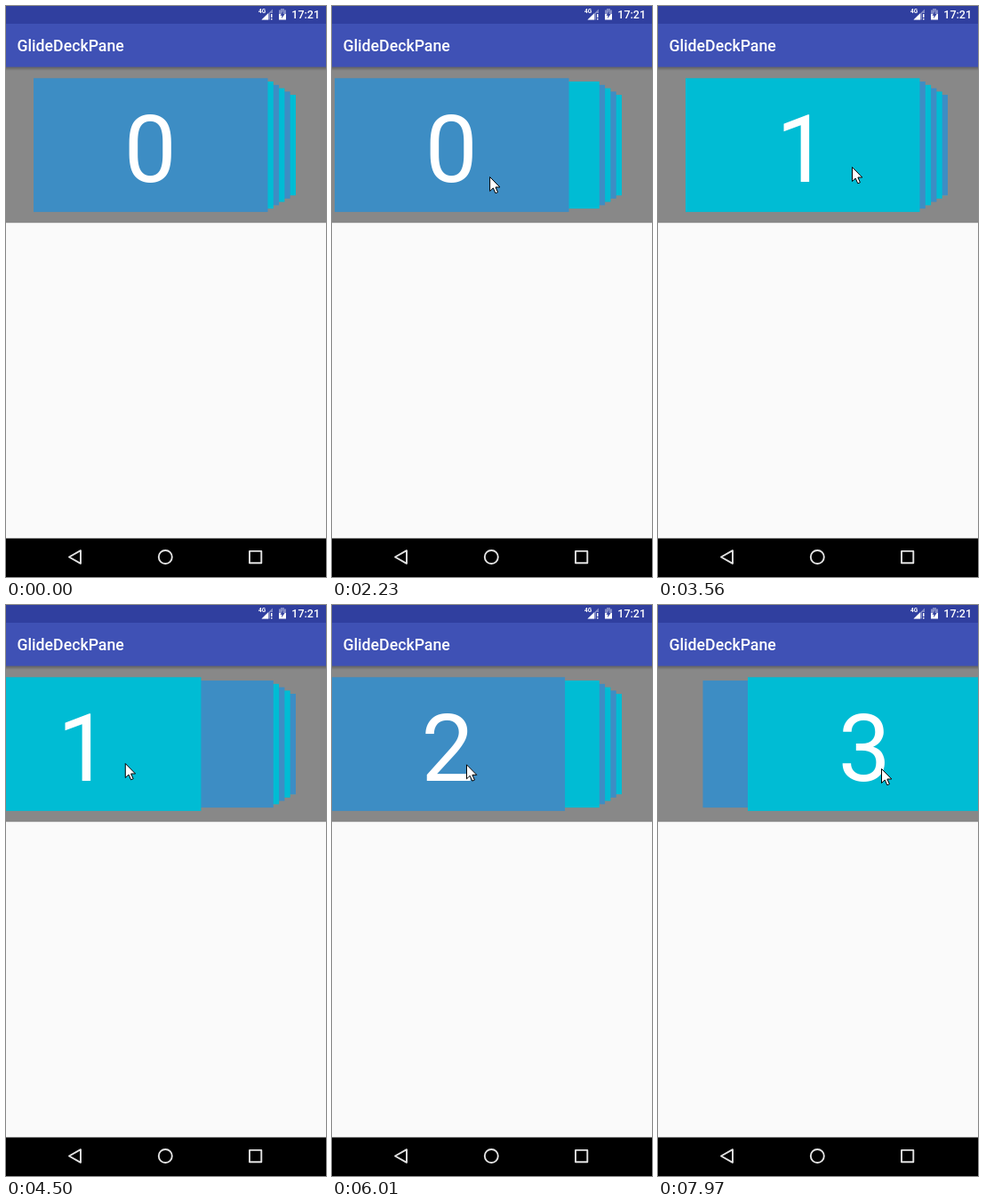
An HTML page with a canvas for the animation above (8 s loop, 360 by 643 pixels).

```html
<!DOCTYPE html>
<html lang="en">
<head>
<meta charset="utf-8">
<title>Card deck</title>
<style>
html, body { margin: 0; width: 100%; height: 100%; overflow: hidden; background: #fafafa; }
canvas { display: block; width: 360px; height: 643px; }
</style>
</head>
<body>
<canvas id="stage"></canvas>
<script>
const W = 360, H = 643, LOOP = 8000;
const canvas = document.getElementById('stage');
const ctx = canvas.getContext('2d');
const dpr = window.devicePixelRatio || 1;
canvas.width = W * dpr;
canvas.height = H * dpr;

// The screen refreshes in evenly stepped bursts: first step, last step, count.
const bursts = [
  [710, 1700, 8], [1950, 2890, 8], [3040, 3560, 5], [3990, 4920, 8],
  [5070, 5490, 4], [5760, 6730, 8], [6850, 7420, 5], [7700, 7970, 3]
];

// One accelerating swipe per card, in deck order.
const swipes = [
  { start: 1950, time: 894, dist: -310 },
  { start: 3990, time: 1080, dist: -310 },
  { start: 5760, time: 857, dist: -310 },
  { start: 7650, time: 320, dist: 70 }
];
const SETTLE_DELAY = 33, SETTLE_TIME = 350;

// Turning points of the mouse pointer: time, x, y.
const pointer = [
  [710, 287, 548], [1700, 221, 193], [2220, 177, 192], [2600, 120, 196],
  [2890, 162, 197], [3560, 218, 181], [4520, 134, 178], [4700, 105, 178],
  [5350, 238, 181], [6590, 81, 178], [7420, 173, 185], [7970, 251, 184]
];

const clamp = (v, lo, hi) => Math.min(hi, Math.max(lo, v));
const mix = (a, b, f) => a + (b - a) * f;
const ease = f => (1 - Math.cos(Math.PI * clamp(f, 0, 1))) / 2;

function stepTime(t) {
  const burst = bursts.filter(b => b[0] <= t).pop();
  if (!burst) return 0;
  const [first, last, count] = burst;
  const step = (last - first) / (count - 1);
  return first + step * Math.min(count - 1, Math.floor((t - first) / step + 0.2));
}

function dragOffset(swipe, t) {
  return swipe ? swipe.dist * clamp((t - swipe.start) / swipe.time, 0, 1) ** 2 : 0;
}

// How many places the deck has moved forward.
function deckShift(t) {
  return swipes.reduce((sum, s) =>
    sum + ease((t - s.start - s.time - SETTLE_DELAY) / SETTLE_TIME), 0);
}

function rect(color, x, y, w, h) {
  ctx.fillStyle = color;
  ctx.fillRect(x, y, w, h);
}

function path(points) {
  ctx.beginPath();
  points.forEach(([x, y]) => ctx.lineTo(x, y));
  ctx.closePath();
}

function fillPath(color, points) {
  path(points);
  ctx.fillStyle = color;
  ctx.fill();
}

function label(text, x, y, font, align = 'left') {
  ctx.font = font + ' Roboto, sans-serif';
  ctx.textAlign = align;
  ctx.fillStyle = '#fff';
  ctx.fillText(text, x, y);
}

function drawStatus() {
  const dim = 'rgba(255,255,255,.4)';
  rect('#303f9f', 0, 0, W, 20);
  label('4G', 284, 8, '700 6.5px');
  fillPath(dim, [[287.5, 15.5], [300, 3.5], [300, 8], [297, 8], [297, 15.5]]);
  fillPath('#fff', [[287.5, 15.5], [295, 8.3], [295, 15.5]]);
  rect('#fff', 298, 9, 1.5, 4);
  rect('#fff', 298, 14, 1.5, 1.5);

  rect(dim, 309, 3, 4, 1.5);
  rect(dim, 307, 4.5, 8, 4.5);
  rect('#fff', 307, 9, 8, 6.5);
  fillPath('#303f9f', [[312, 5.5], [308.5, 10.7], [310.5, 10.7], [310, 14.3], [313.6, 9], [311.5, 9]]);
  label('17:21', 321.3, 14.2, '500 12.5px');
}

function drawAppBar() {
  rect('#3f51b5', 0, 20, W, 48.7);
  const shade = ctx.createLinearGradient(0, 68.7, 0, 73);
  shade.addColorStop(0, 'rgba(0,0,0,.28)');
  shade.addColorStop(1, 'rgba(0,0,0,0)');
  rect(shade, 0, 68.7, W, 4.3);
  label('GlideDeckPane', 12.5, 51, '500 17.7px');
}

function drawNav() {
  rect('#000', 0, 599.5, W, 43.5);
  ctx.strokeStyle = '#e2e2e2';
  ctx.lineWidth = 1.9;
  ctx.lineJoin = 'round';
  path([[71, 620.5], [84, 613.2], [84, 627.8]]);
  ctx.stroke();
  ctx.beginPath();
  ctx.arc(179.3, 620.5, 7.5, 0, Math.PI * 2);
  ctx.stroke();
  ctx.strokeRect(274, 613.9, 13.3, 13.3);
}

function drawCard(i, level, offset) {
  const scale = 1 - level * 0.05;
  const w = 263.5 * scale, h = 150.6 * scale;
  const right = 294.5 + 6.3 * level + offset, midY = 156.6;
  rect(i % 2 ? '#00bcd4' : '#3d8dc4', right - w, midY - h / 2, w, h);
  ctx.save();
  ctx.translate(right - w / 2, midY);
  ctx.scale(scale, scale);
  label(i, -0.4, 41.4, '400 105px', 'center');
  ctx.restore();
}

function drawDeck(t) {
  const shift = deckShift(t);
  for (let i = 9; i >= 0; i--) {
    drawCard(i, clamp(i - shift, 0, 5), dragOffset(swipes[i], t));
  }
}

function drawPointer(t) {
  const next = pointer.findIndex(p => p[0] >= t);
  if (t < pointer[0][0]) return;
  const b = pointer[next], a = pointer[Math.max(0, next - 1)];
  const f = a === b ? 0 : (t - a[0]) / (b[0] - a[0]);
  ctx.save();
  ctx.translate(mix(a[1], b[1], f) + 0.5, mix(a[2], b[2], f) + 0.5);
  fillPath('#fff', [[0, 0], [0, 16], [3.7, 12.5], [6.3, 18.3], [8.9, 17.2], [6.4, 11.5], [11.3, 11.5]]);
  ctx.strokeStyle = '#000';
  ctx.lineWidth = 1;
  ctx.lineJoin = 'miter';
  ctx.stroke();
  ctx.restore();
}

function draw(t) {
  ctx.setTransform(dpr, 0, 0, dpr, 0, 0);
  rect('#fafafa', 0, 0, W, H);
  rect('#888', 0, 68, W, 176.2);
  drawDeck(t);
  drawStatus();
  drawAppBar();
  drawNav();
  drawPointer(t);
}

const start = performance.now();
function loop() {
  draw(stepTime((performance.now() - start) % LOOP));
  requestAnimationFrame(loop);
}
loop();
</script>
</body>
</html>
```
